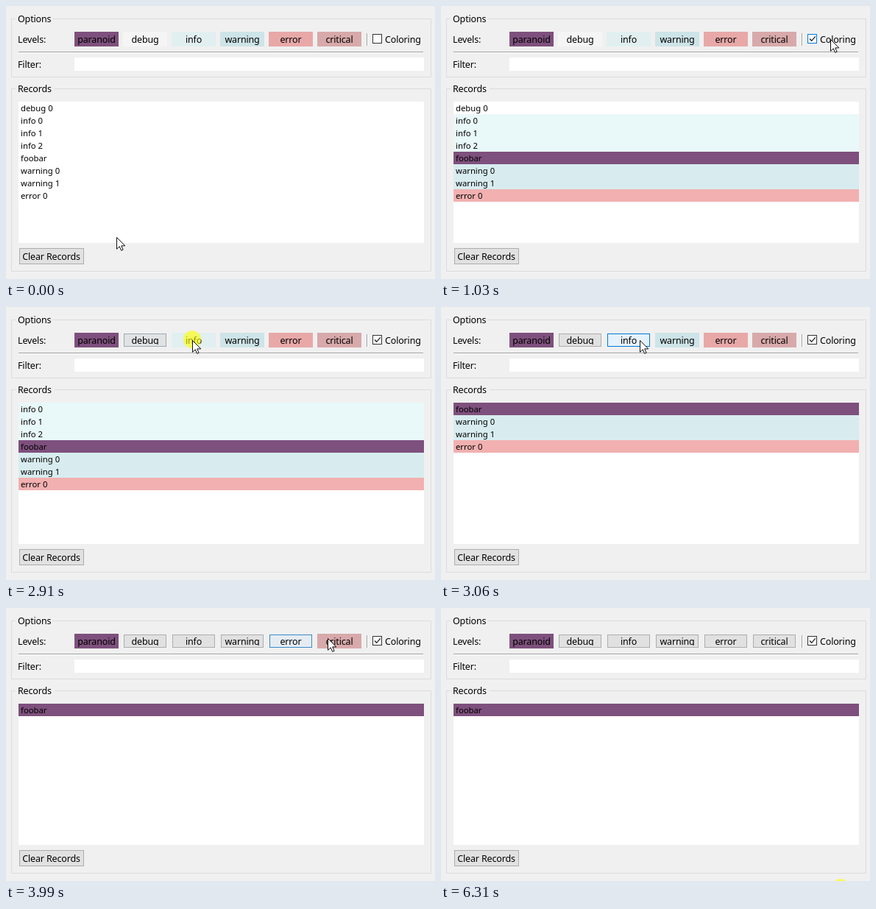
These frames come from a looping animation (583x371 px, 6460 ms). An HTML page:

```html
<!DOCTYPE html>
<html lang="en">
<head>
<meta charset="utf-8">
<title>Log viewer</title>
<style>
  html, body { margin: 0; width: 100%; height: 100%; overflow: hidden; background: #f0f0f0; }
  svg { display: block; width: 583px; height: 371px; }
  text { font: 12.5px "Noto Sans", "Open Sans", sans-serif; letter-spacing: -.16px; fill: #000; }
  .mid { text-anchor: middle; }
  .row text { font-size: 11.3px; letter-spacing: 0; }
</style>
</head>
<body>
<svg id="stage" viewBox="0 0 583 371">
  <defs><clipPath id="short"><rect x="90" y="36" width="400" height="15"/></clipPath></defs>
  <rect width="583" height="371" fill="#f0f0f0"/>
  <g fill="none" stroke="#dcdcdc">
    <path d="M13 17.5H7.5V96.5H577.5V17.5H63"/>
    <path d="M13 112.5H7.5V360.5H577.5V112.5H66"/>
  </g>
  <text x="16" y="22">Options</text>
  <text x="16" y="50">Levels:</text>
  <text x="16" y="84">Filter:</text>
  <text x="16" y="117">Records</text>
  <path d="M17 62.5H567M490.5 37V54" stroke="#a0a0a0"/>
  <path d="M17 63.5H567M491.5 37V54" stroke="#fff"/>
  <rect x="93" y="70" width="475" height="18" fill="#fff"/>
  <rect x="17" y="130" width="551" height="192" fill="#fff"/>
  <rect x="18.5" y="329.5" width="87" height="21" fill="#e1e1e1" stroke="#adadad"/>
  <text class="mid" x="61.5" y="345">Clear Records</text>
  <rect id="box" x="498.5" y="38.5" width="12" height="12" fill="#fff"/>
  <path id="tick" d="M501 44.5l2.7 2.8 5-6" fill="none" stroke="#222" stroke-width="1.3"/>
  <text x="515" y="50">Coloring</text>
  <g id="buttons"></g>
  <g id="rows"></g>
  <circle id="press" r="12" fill="#ff0" fill-opacity=".62"/>
  <path id="cursor" d="M.5.5V16.3L4.2 12.8 6.7 18.3 9.1 17.2 6.7 11.9H11.8Z" fill="#fff" stroke="#111"/>
</svg>
<script>
const LOOP = 6460, STEP = 78.75, FADE = 240, COLOR_AT = 950;
const $ = id => document.getElementById(id);

function add(parent, tag, attrs, label) {
  const el = document.createElementNS("http://www.w3.org/2000/svg", tag);
  set(el, attrs);
  if (label) el.textContent = label;
  return parent.appendChild(el);
}
function set(el, attrs) {
  for (const k in attrs) el.setAttribute(k, attrs[k]);
}
const show = (el, on) => set(el, { visibility: on ? "visible" : "hidden" });
const mix = (a, b, k) => `rgb(${a.map((v, i) => Math.round(v + (b[i] - v) * k))})`;

// off: time the level is switched off; leave: time the pointer leaves the button
const levels = [
  { name: "paranoid", fill: "#7e507d", row: "#7e507d", off: Infinity, leave: 0 },
  { name: "debug", fill: "#f5f5f5", row: "#ffffff", off: 2510, leave: 2690 },
  { name: "info", fill: "#e1eff0", row: "#e9f8f9", off: 2985, leave: 3060 },
  { name: "warning", fill: "#cde4e8", row: "#d8ecef", off: 3420, leave: 3450 },
  { name: "error", fill: "#e8a8a8", row: "#f2b0b0", off: 3760, leave: 3910 },
  { name: "critical", fill: "#d8a9aa", row: "#d8a9aa", off: 4225, leave: 5630 }
];
levels.forEach((l, i) => {
  const x = 93 + 66 * i;
  l.on = add($("buttons"), "rect", { x, y: 35, width: 60, height: 20, fill: l.fill });
  l.plain = add($("buttons"), "rect", { x: x + 1.5, y: 36.5, width: 57, height: 17 });
  l.label = add($("buttons"), "text", { x: x + 30, y: 50, class: "mid" }, l.name);
});

const records = [
  ["debug 0", 1], ["info 0", 2], ["info 1", 2], ["info 2", 2],
  ["foobar", 0], ["warning 0", 3], ["warning 1", 3], ["error 0", 4]
].map(([label, i]) => {
  const g = add($("rows"), "g", { class: "row" });
  const bar = add(g, "rect", { x: 17, y: 130, width: 551, height: 17 });
  add(g, "text", { x: 20, y: 143 }, label);
  return { g, bar, level: levels[i] };
});

// pointer legs: start time, number of steps, x, y
const legs = [
  [80, 9, 529, 45], [1970, 6, 175, 41], [2690, 3, 253, 45], [3060, 3, 320, 45],
  [3420, 1, 321, 41], [3450, 3, 385, 43], [3830, 3, 437, 41], [5630, 7, 543, 381]
];
const presses = [[880, 1030], [2430, 2600], [2910, 3060], [3300, 3420], [3680, 3830], [4150, 4305], [6310, LOOP]];
const ease = k => k * k * (3 - 2 * k);

function pointer(t) {
  let x = 150, y = 314;
  for (const [start, n, tx, ty] of legs) {
    if (t < start) break;
    const k = ease(Math.min(1, (Math.floor((t - start) / STEP) + 1) / n));
    x += (tx - x) * k;
    y += (ty - y) * k;
  }
  return [Math.round(x), Math.round(y)];
}

function draw(t) {
  for (const l of levels) {
    const off = t >= l.off;
    show(l.on, !off);
    show(l.plain, off);
    const hover = 1 - Math.min(1, Math.max(0, (t - l.leave) / FADE));
    set(l.plain, {
      fill: mix([225, 225, 225], [229, 241, 251], hover),
      stroke: mix([173, 173, 173], [0, 120, 215], hover)
    });
    set(l.label, { "clip-path": off ? "url(#short)" : "none" });
  }

  const colored = t >= COLOR_AT;
  let line = 0;
  for (const r of records) {
    const visible = t < r.level.off;
    show(r.g, visible);
    if (!visible) continue;
    set(r.g, { transform: `translate(0 ${17 * line++})` });
    set(r.bar, { fill: colored ? r.level.row : "#fff" });
  }
  show($("tick"), colored);
  set($("box"), { stroke: t >= 710 && t < 1970 ? "#0078d7" : "#333" });

  const [x, y] = pointer(t);
  set($("cursor"), { transform: `translate(${x} ${y})` });
  set($("press"), { cx: x, cy: y - 1 });
  show($("press"), presses.some(([a, b]) => t >= a && t < b));
}

const began = performance.now();
function tick() {
  draw((performance.now() - began) % LOOP);
  requestAnimationFrame(tick);
}
tick();
</script>
</body>
</html>
```
